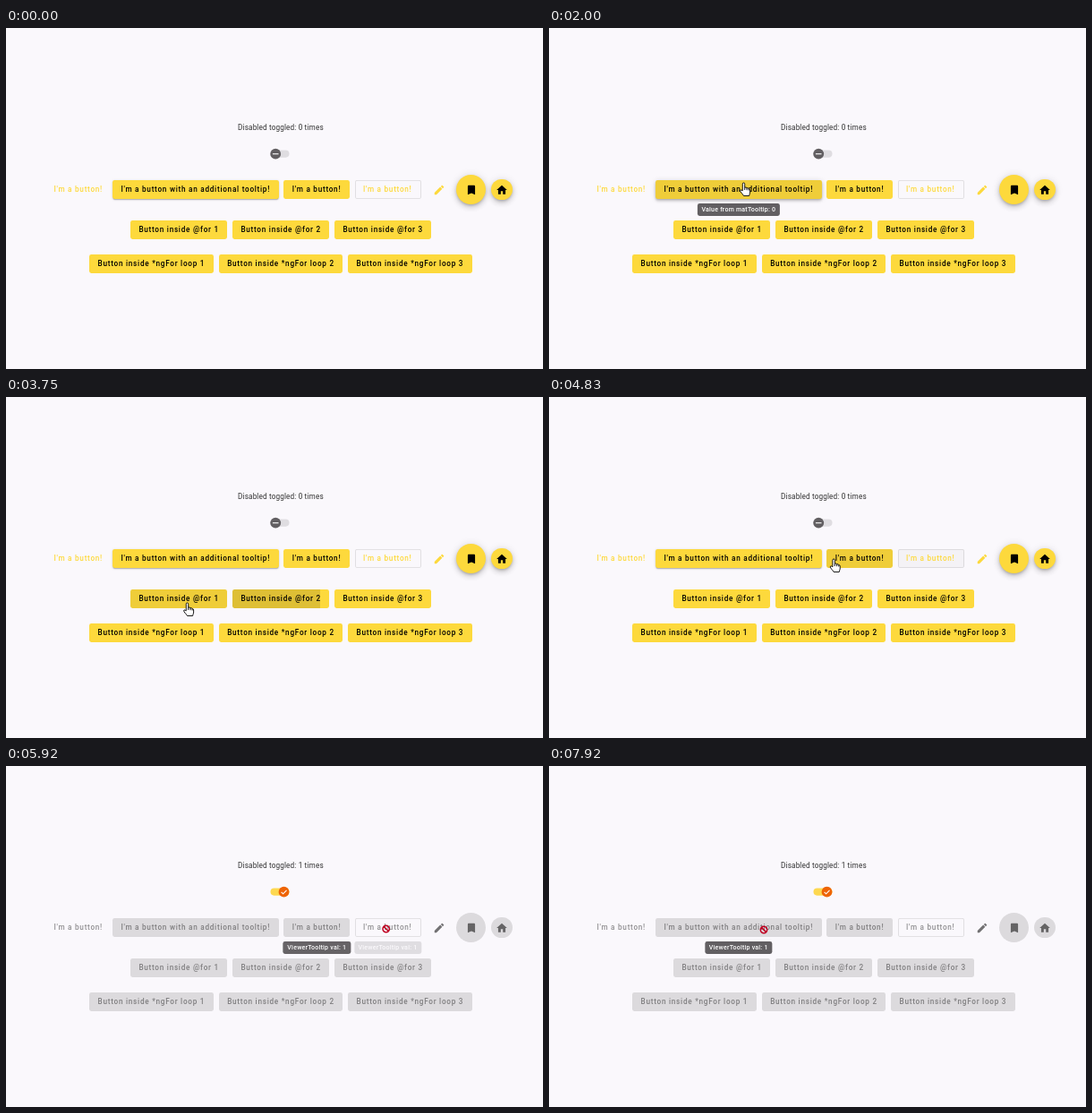
Recreate the animation shown at these times as an HTML page. Size 600x381 px, loop 8000 ms.

```html
<!DOCTYPE html>
<html lang="en">
<head>
<meta charset="utf-8">
<title>Button tooltips</title>
<style>
  html, body { margin: 0; width: 100%; height: 100%; overflow: hidden; background: #faf8fc; }
  body { position: relative; font: 500 8.2px/21px Roboto, sans-serif; color: #000; }
  body > * { position: absolute; }
  .count { left: 259px; top: 100.5px; font-weight: 400; letter-spacing: .146px; color: #333; white-space: pre; }
  .btn { box-sizing: border-box; border-radius: 2.4px; letter-spacing: .73px; white-space: nowrap; overflow: hidden; }
  .btn span { position: absolute; left: 9.4px; top: 0; }
  .btn i { position: absolute; inset: 0; background: #000; opacity: 0; }
  .btn svg { position: absolute; left: 50%; top: 50%; width: 14px; height: 14px; margin: -7px; fill: currentColor; }
  .flat, .raised, .fab { background: #fdd93c; }
  .text, .line, .icon { color: #fdd93c; }
  .line { box-shadow: inset 0 0 0 .8px rgba(0, 0, 0, .13); }
  .raised { box-shadow: 0 1.8px .6px -1.2px rgba(0,0,0,.2), 0 1.2px 1.2px rgba(0,0,0,.14), 0 .6px 3px rgba(0,0,0,.12); }
  .raised.hover { box-shadow: 0 1.2px 2.3px -.6px rgba(0,0,0,.2), 0 2.3px 3px rgba(0,0,0,.14), 0 .6px 6px rgba(0,0,0,.12); }
  .fab, .icon { border-radius: 50%; }
  .fab { box-shadow: 0 1.8px 3px -.6px rgba(0,0,0,.2), 0 3.5px 6px rgba(0,0,0,.14), 0 .6px 10px rgba(0,0,0,.12); }
  .off .btn { color: rgba(0, 0, 0, .42); }
  .off .flat, .off .raised, .off .fab { background: #dcdadd; box-shadow: none; }
  .off .icon, .off .fab { color: rgba(0, 0, 0, .54); }
  .tip { height: 13.5px; padding: 0 4.7px; border-radius: 2.4px; background: #625f62; color: #fff;
         font-size: 7.02px; line-height: 13.5px; letter-spacing: .23px; white-space: nowrap;
         transform: translateX(-50%); opacity: 0; }
  #over { left: 0; top: 0; width: 600px; height: 381px; overflow: visible; }
</style>
</head>
<body>
<div class="count" id="count"></div>
<svg id="over" viewBox="0 0 600 381">
  <rect id="track" x="295.5" y="136.5" width="21" height="8.2" rx="4.1"/>
  <g id="thumb">
    <circle id="halo" r="13" fill="#000"/>
    <circle id="knob" r="5.9"/>
    <path id="mark" fill="none" stroke="#fff" stroke-width="1.1"/>
  </g>
  <g id="cursor">
    <path id="arrow" fill="#fff" stroke="#000" stroke-width=".7" d="M0 0V10.5L2.4 8.3 4 12 5.6 11.3 4 7.7H7.3Z"/>
    <path id="hand" fill="#fff" stroke="#000" stroke-width=".9" stroke-linejoin="round"
      d="M-1.2 8V1.2a1.2 1.2 0 0 1 2.4 0V5q2 0 2.3.7q1.8 0 2.1.8q1.5.2 1.5 1.5v3q-.5 1.5-1 3.5H0q-.8-1.6-2.6-3.4q-2-2.4-1-3q.9-.6 2.4.7zM1.2 5v3M3.5 5.7v2.5M5.6 6.5v2"/>
    <path id="deny" fill="none" stroke="#c00022" stroke-width="1.5" d="M3.7 0A3.7 3.7 0 1 1-3.7 0A3.7 3.7 0 1 1 3.7 0M-2.6-2.6L2.6 2.6"/>
  </g>
</svg>
<script>
const $ = id => document.getElementById(id);
const LOOP = 8000, STEP = 1000 / 12, CLICK = 5740;
const ICONS = {
  edit: 'M3 17.25V21h3.75L17.81 9.94l-3.75-3.75zM20.71 7.04a1 1 0 0 0 0-1.41l-2.34-2.34a1 1 0 0 0-1.41 0l-1.83 1.83 3.75 3.75z',
  bookmark: 'M17 3H7c-1.1 0-2 .9-2 2v16l7-3 7 3V5c0-1.1-.9-2-2-2z',
  home: 'M10 20v-6h4v6h5v-8h3L12 3 2 12h3v8z'
};

const add = (cls, html) => {
  const el = document.createElement('div');
  el.className = cls;
  el.innerHTML = html;
  document.body.insertBefore(el, $('over'));
  return el;
};

const buttons = [];
function button(cls, x, y, w, h, label, icon) {
  const inner = icon ? `<svg viewBox="0 0 24 24"><path d="${ICONS[icon]}"/></svg>` : `<span>${label}</span>`;
  const el = add('btn ' + cls, '<i></i>' + inner);
  Object.assign(el.style, { left: x + 'px', top: y + 'px', width: w + 'px', height: h + 'px' });
  buttons.push({ el, shade: el.firstChild, x, y, w, h });
}

button('text', 44, 170, 73.5, 21, "I'm a button!");
button('raised', 119, 170, 186, 21, "I'm a button with an additional tooltip!");
button('flat', 310.3, 170, 73.7, 21, "I'm a button!");
button('line', 389.5, 170, 74, 21, "I'm a button!");
button('icon', 472, 169, 23, 23, '', 'edit');
button('fab', 503, 164, 33, 33, '', 'bookmark');
button('fab', 542, 168.8, 23.6, 23.6, '', 'home');
[139, 253, 367].forEach((x, i) => button('flat', x, 214.5, 108.3, 21, `Button inside @for ${i + 1}`));
[93.2, 237.8, 382.2].forEach((x, i) => button('flat', x, 253.2, 138.7, 21, `Button inside *ngFor loop ${i + 1}`));
const RIPPLED = 8;

// centre x, top, shown from, hidden from
const VIEWER = 'ViewerTooltip val: 1';
const tips = [
  [211.8, 196, 1560, 2170, 'Value from matTooltip: 0'],
  [347.3, 196, 5820, 7080],
  [426.5, 196, 5900, 7160],
  [421.5, 240.5, 5980, 7240],
  [307, 240.5, 6060, 7320],
  [451.8, 279.3, 6080, 7340],
  [307, 279.3, 6100, 7580],
  [162.6, 279.3, 6150, 7410],
  [211.7, 196, 7640, 9000]
].map(([x, y, from, to, label = VIEWER]) => {
  const el = add('tip', label);
  el.style.left = x + 'px';
  el.style.top = y + 'px';
  return { el, from, to };
});

// pointer path: time, x, y
const path = [
  [500, 68, 101], [833, 160, 135], [1250, 225, 166], [1333, 220, 175], [1667, 217.5, 173], [2170, 217.5, 173],
  [2417, 195, 222], [2667, 172, 262], [2917, 234, 264], [3083, 300, 266], [3333, 450, 266], [3500, 425, 230],
  [3667, 295, 230], [3750, 202.5, 230], [3917, 215, 228], [4083, 300, 222], [4250, 350, 185], [4333, 430, 184],
  [4417, 483, 183], [4500, 520, 182], [4583, 554, 183], [4667, 512, 184], [4750, 420, 182], [4833, 318.5, 181],
  [4917, 220, 180], [5000, 85, 178], [5167, 130, 176], [5417, 295, 146], [5500, 301, 142], [5583, 302.5, 141],
  [5750, 302.5, 141], [5833, 345, 180], [5917, 425, 182], [6000, 420, 225], [6083, 320, 228], [6167, 430, 264],
  [6250, 195, 262], [6333, 240, 190], [6417, 302, 142], [6667, 302, 142], [6750, 275, 175], [6833, 215, 240],
  [6917, 164, 276], [7083, 185, 268], [7250, 290, 265], [7417, 262, 222], [7583, 246, 190], [7750, 240, 183],
  [8000, 240, 183]
];

const clamp = v => Math.max(0, Math.min(1, v));

function pointer(t) {
  if (t < path[0][0] - 2) return null;
  let i = 1;
  while (i < path.length - 1 && path[i][0] < t) i++;
  const [t0, x0, y0] = path[i - 1], [t1, x1, y1] = path[i];
  const k = clamp((t - t0) / (t1 - t0));
  return { x: x0 + (x1 - x0) * k, y: y0 + (y1 - y0) * k };
}

const inside = (p, b) => !!p && p.x >= b.x && p.x <= b.x + b.w && p.y >= b.y && p.y <= b.y + b.h + 2;
const SWITCH = { x: 294, y: 133, w: 24, h: 13 };

function draw(t) {
  const off = t >= CLICK, p = pointer(t), before = pointer(t - STEP);
  document.body.className = off ? 'off' : '';
  $('count').textContent = `Disabled toggled: ${off ? 1 : 0} times`;

  let onButton = false;
  buttons.forEach((b, i) => {
    const over = inside(p, b), left = !over && inside(before, b);
    onButton = onButton || over;
    const ripple = left && i === RIPPLED;
    b.el.classList.toggle('hover', over);
    b.shade.style.opacity = off ? 0 : over ? .055 : ripple ? .12 : left ? .025 : 0;
    b.shade.style.right = ripple ? '10px' : 0;
  });

  for (const { el, from, to } of tips)
    el.style.opacity = clamp((t - from) / 100) * (1 - clamp((t - to) / 75));

  const onSwitch = inside(p, SWITCH);
  const slide = clamp((t - CLICK + 40) / 120);
  $('track').setAttribute('fill', off ? '#fdd850' : '#dfdde1');
  $('thumb').setAttribute('transform', `translate(${301.2 + 9.3 * slide} 140.7)`);
  $('knob').setAttribute('fill', off ? '#ee6405' : onSwitch ? '#212121' : '#625f62');
  $('mark').setAttribute('d', off ? 'M-2.9.1L-.9 2.1 3-1.9' : 'M-3.3 0H3.3');
  $('halo').setAttribute('opacity', onSwitch ? .08 : 0);

  const kind = !p ? '' : onButton ? (off ? 'deny' : 'hand') : onSwitch ? 'hand' : 'arrow';
  for (const id of ['arrow', 'hand', 'deny']) $(id).style.display = id === kind ? '' : 'none';
  if (p) $('cursor').setAttribute('transform', `translate(${p.x} ${p.y})`);
}

const start = performance.now();
function tick(now) {
  const t = Math.max(0, now - start) % LOOP;
  draw(Math.floor((t + 5) / STEP) * STEP);
  requestAnimationFrame(tick);
}
draw(0);
requestAnimationFrame(tick);
</script>
</body>
</html>
```
